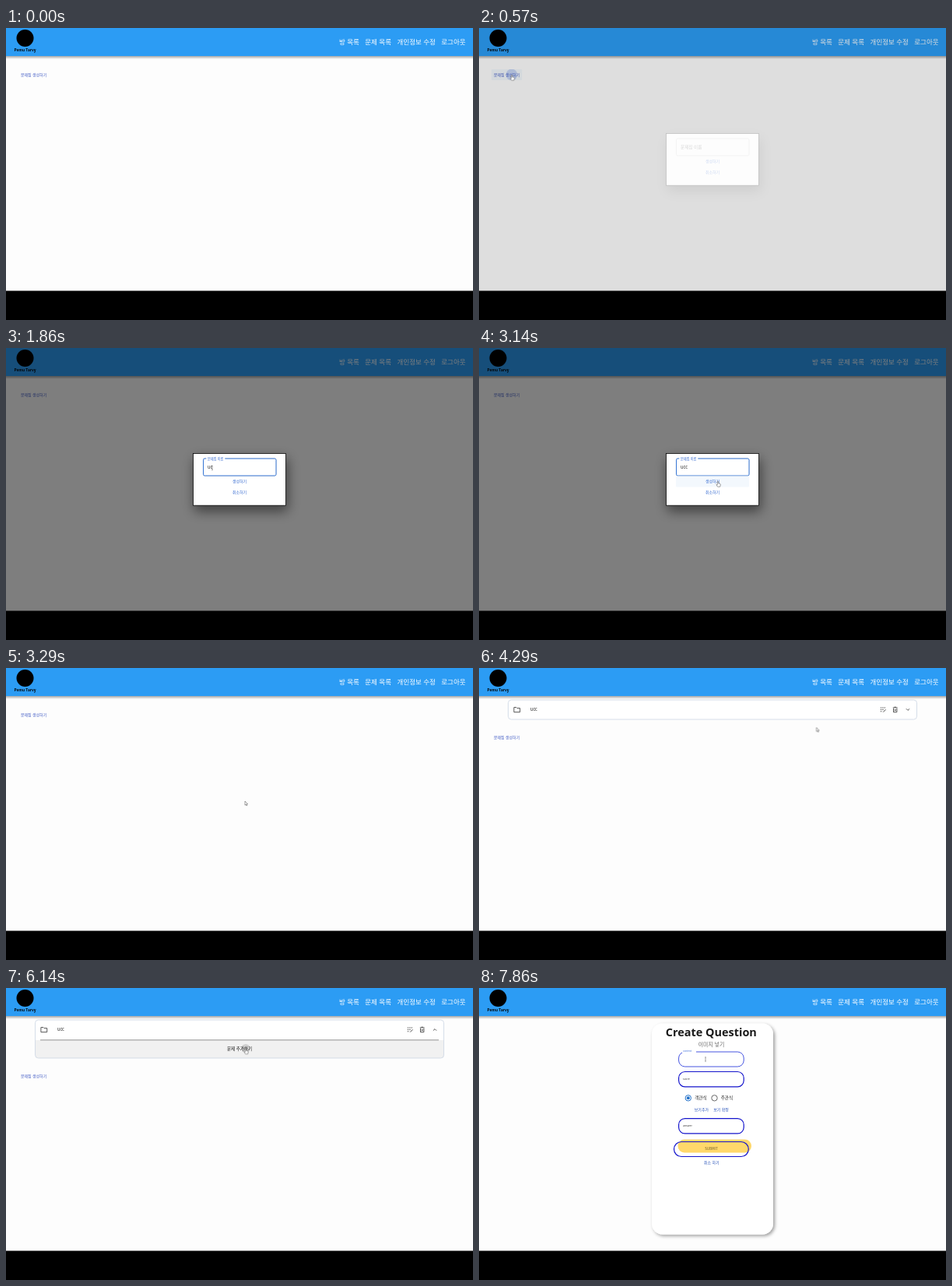
Animation, 600 px wide and 375 px high, one loop 8 s. Source, as an HTML page:

```html
<!DOCTYPE html>
<html lang="ko">
<head>
<meta charset="utf-8">
<title>문제 목록</title>
<style>
html, body { margin: 0; width: 100%; height: 100%; overflow: hidden; background: #000; }
svg { display: block; width: 100vw; height: 100vh; }
text { font-family: "Noto Sans CJK KR", "Noto Sans CJK", "Noto Sans", sans-serif; }
.nav text { font-size: 8.5px; fill: #fff; }
.s { font-size: 4.95px; }
.m { font-size: 5.6px; }
.link { fill: #3f59c4; }
.act { fill: #2f66cf; }
.mid { text-anchor: middle; }
.box { fill: none; stroke: #1414cc; stroke-width: 1.2; }
.icon { fill: none; stroke: #444; stroke-width: .9; }

/* one clock for everything: 1% is 80 ms */
.a { animation: 8s linear infinite; }
.h { animation: 8s step-end infinite; }

.quiz { animation-name: quiz; }
@keyframes quiz { 0% { opacity: 1 } 78.5%, 100% { opacity: 0 } }
.create { animation-name: create; }
@keyframes create { 0% { opacity: 0 } 78.5%, 100% { opacity: 1 } }

.newset { animation-name: newset; }
@keyframes newset {
  0%, 42.8% { transform: translateY(0) }
  42.81%, 62% { transform: translateY(29px); animation-timing-function: cubic-bezier(.4,0,.2,1) }
  66.1%, 100% { transform: translateY(53px) }
}
.linkhover { animation-name: linkhover; }
@keyframes linkhover { 0% { opacity: 0 } 5.35% { opacity: 1 } 10.7%, 100% { opacity: 0 } }
.linkripple { animation-name: linkripple; }
@keyframes linkripple {
  0%, 6.2% { r: 2px; opacity: 0 }
  6.3% { r: 2px; opacity: .24 }
  8.8%, 10.6% { r: 18px; opacity: .24 }
  12%, 100% { r: 20px; opacity: 0 }
}

.modal { animation-name: modal; }
@keyframes modal {
  0%, 6.6% { opacity: 0 }
  8.8%, 41.05% { opacity: 1 }
  41.06%, 100% { opacity: 0 }
}
.focus { animation-name: focus; }
@keyframes focus { 0% { opacity: 0 } 14.25%, 100% { opacity: 1 } }
.label { animation-name: label; }
@keyframes label {
  0%, 14.25% { transform: translate(259px, 155.1px); fill: #666; animation-timing-function: ease-out }
  16.8%, 100% { transform: translate(259px, 143.6px) scale(.75); fill: #2f66cf }
}
.k1 { animation-name: k1; }
.k2 { animation-name: k2; }
.k3 { animation-name: k3; }
@keyframes k1 { 0% { opacity: 0 } 21.3%, 100% { opacity: 1 } }
@keyframes k2 { 0% { opacity: 0 } 23.2%, 100% { opacity: 1 } }
@keyframes k3 { 0% { opacity: 0 } 25%, 100% { opacity: 1 } }
.okhover { animation-name: okhover; }
@keyframes okhover { 0% { opacity: 0 } 34.5%, 100% { opacity: 1 } }

.item { animation-name: item; }
@keyframes item { 0% { opacity: 0 } 42.8%, 100% { opacity: 1 } }
.grow { animation-name: grow; }
@keyframes grow {
  0%, 62% { height: 25px; animation-timing-function: cubic-bezier(.4,0,.2,1) }
  66.1%, 100% { height: 49px }
}
.body { animation-name: body; }
@keyframes body { 0% { opacity: 0 } 62%, 100% { opacity: 1 } }
.chev { animation-name: chev; transform-origin: 551px 53.5px; }
@keyframes chev { 0%, 62% { transform: rotate(180deg) } 64%, 100% { transform: rotate(0) } }
.wave { animation-name: wave; }
@keyframes wave {
  0%, 61.9% { r: 10px; opacity: 0 }
  62% { r: 10px; opacity: .18 }
  64.2%, 66% { r: 278px; opacity: .18 }
  67.9% { r: 440px; opacity: .09 }
  69.6%, 100% { r: 440px; opacity: 0 }
}
.addhover { animation-name: addhover; }
@keyframes addhover { 0% { opacity: 0 } 71.3%, 100% { opacity: 1 } }
.addripple { animation-name: addripple; }
@keyframes addripple {
  0%, 75% { r: 0; opacity: 0 }
  75.1% { r: 1px; opacity: .14 }
  76.7%, 100% { r: 5.6px; opacity: .14 }
}

.cfocus { animation-name: cfocus; }
@keyframes cfocus { 0% { opacity: 0 } 92.9%, 100% { opacity: 1 } }
.cidle { animation-name: cidle; }
@keyframes cidle { 0% { opacity: 1 } 92.9%, 100% { opacity: 0 } }
.clabel { animation-name: clabel; }
@keyframes clabel {
  0%, 92.9% { transform: translate(262px, 92.3px); fill: #333; animation-timing-function: ease-out }
  95.4%, 100% { transform: translate(262px, 82px) scale(.88); fill: #3567d8 }
}

.cursor { animation-name: cursor; animation-timing-function: ease-in-out; }
@keyframes cursor {
  0%, 5.35% { transform: translate(42px, 62px) }
  7.1% { transform: translate(42px, 60px) }
  8.8% { transform: translate(261.5px, 123.3px) }
  12.5% { transform: translate(285px, 152px) }
  17.8%, 30.4% { transform: translate(265px, 154px) }
  37.5%, 44.6% { transform: translate(307px, 171px) }
  57.1%, 66.1% { transform: translate(457.5px, 58.5px) }
  73.2%, 85.8% { transform: translate(308px, 77.5px) }
  93%, 100% { transform: translate(291px, 91.5px) }
}
.arrow { animation-name: arrow; }
@keyframes arrow {
  0% { opacity: 0 } 7.6% { opacity: 1 } 11.6% { opacity: 0 }
  41.06% { opacity: 1 } 56% { opacity: 0 }
  78.5% { opacity: 1 } 89%, 100% { opacity: 0 }
}
.hand { animation-name: hand; }
@keyframes hand {
  0% { opacity: 0 } 5.35% { opacity: 1 } 7.6% { opacity: 0 }
  34.5% { opacity: 1 } 41.06% { opacity: 0 }
  56% { opacity: 1 } 78.5%, 100% { opacity: 0 }
}
.beam { animation-name: beam; }
@keyframes beam {
  0% { opacity: 0 } 11.6% { opacity: 1 } 34.5% { opacity: 0 } 89%, 100% { opacity: 1 }
}
</style>
</head>
<body>
<svg viewBox="0 0 600 375" preserveAspectRatio="none">
  <defs>
    <linearGradient id="drop" x2="0" y2="1">
      <stop stop-color="#000" stop-opacity=".34"/>
      <stop offset="1" stop-color="#000" stop-opacity="0"/>
    </linearGradient>
    <filter id="deep" x="-50%" y="-50%" width="200%" height="220%">
      <feDropShadow dy="7" stdDeviation="8" flood-opacity=".5"/>
    </filter>
    <filter id="soft" x="-20%" y="-20%" width="140%" height="140%">
      <feDropShadow dy="2" stdDeviation="2.2" flood-opacity=".38"/>
    </filter>
    <clipPath id="linkclip"><rect x="16" y="53" width="39.5" height="14" rx="1.2"/></clipPath>
    <clipPath id="itemclip"><rect class="a grow" x="37.5" y="41" width="525.5" height="25" rx="4"/></clipPath>
    <clipPath id="headclip"><rect x="37.5" y="44" width="525.5" height="19"/></clipPath>
  </defs>

  <rect width="600" height="338" fill="#fdfdfd"/>
  <rect y="36" width="600" height="4" fill="url(#drop)"/>
  <rect width="600" height="36" fill="#2c9cf4"/>
  <circle cx="24.5" cy="13" r="11" fill="#000"/>
  <text class="mid" x="24.5" y="30" font-size="4.8" font-weight="700">Pemu Tarvy</text>
  <g class="nav">
    <text x="428" y="21.2">방 목록</text>
    <text x="461.3" y="21.2">문제 목록</text>
    <text x="502.6" y="21.2">개인정보 수정</text>
    <text x="559.3" y="21.2">로그아웃</text>
  </g>

  <g class="h quiz">
    <g class="a newset">
      <g clip-path="url(#linkclip)">
        <rect class="h linkhover" x="16" y="53" width="39.5" height="14" fill="#1976d2" fill-opacity=".05"/>
        <circle class="a linkripple" cx="42" cy="60" r="2" fill="#3f6ee0"/>
      </g>
      <text class="s link" x="19" y="61.8">문제집 생성하기</text>
    </g>

    <g class="h item">
      <rect class="a grow" x="37.5" y="41" width="525" height="25" rx="4" fill="#fff"/>
      <g clip-path="url(#itemclip)">
        <g class="h body">
          <rect class="h addhover" x="37.5" y="67" width="525" height="24" fill="#f1f1f1"/>
          <circle class="a addripple" cx="308" cy="77.5" r="0" fill="#000"/>
          <path d="M44 66.8H556" stroke="#b4b4b4" stroke-width="1.4"/>
          <text class="mid" x="300" y="80" font-size="5.55" fill="#111">문제 추가하기</text>
        </g>
        <g clip-path="url(#headclip)">
          <circle class="a wave" cx="458" cy="60" r="10" fill="#000"/>
        </g>
        <path class="icon" d="M44.9 50.6H48L49 51.6H52.7V56.7H44.9Z"/>
        <text class="m" x="66" y="55" fill="#222">ucc</text>
        <path class="icon" d="M515.8 51H522.8M515.8 53.4H520M515.8 55.8H518.4" stroke-dasharray="1.5 .9"/>
        <path class="icon" d="M519.3 56.6L522.6 53.3"/>
        <path class="icon" d="M531.8 50.9H537.6M533.6 50.2H535.8M532.5 51.8V56.7H536.9V51.8M533.8 53.2L535.6 55.2M535.6 53.2L533.8 55.2"/>
        <path class="icon a chev" d="M548.9 54.7L551 52.6L553.1 54.7"/>
      </g>
      <rect class="a grow" x="37.5" y="41" width="525" height="25" rx="4" fill="none" stroke="#ccd6e4" stroke-width=".8"/>
    </g>
  </g>

  <g class="a modal">
    <rect width="600" height="338" fill="#000" fill-opacity=".5"/>
    <rect x="240.4" y="135.4" width="119.2" height="66.8" fill="#fff" stroke="#000" stroke-width=".8" filter="url(#deep)"/>
    <rect x="253.5" y="142" width="93.5" height="22" rx="1.8" fill="none" stroke="#c4c4c4" stroke-width=".7"/>
    <g class="h focus">
      <rect x="253.5" y="142" width="93.5" height="22" rx="1.8" fill="#fff" stroke="#3474d4"/>
      <path d="M257.3 142H281.3" stroke="#fff" stroke-width="2"/>
    </g>
    <text class="m a label">문제집 이름</text>
    <text class="m" x="259" y="155.2" fill="#222"><tspan class="h k1" visibility="hidden"></tspan></text>
    <g class="m" fill="#222">
      <text class="h k1" x="259" y="155.2">u</text>
      <text class="h k2" x="262.4" y="155.2">c</text>
      <text class="h k3" x="265.3" y="155.2">c</text>
    </g>
    <rect class="h okhover" x="253" y="164.5" width="94" height="14" rx="1.2" fill="#f3f8fd"/>
    <text class="s act mid" x="300" y="172.7">생성하기</text>
    <text class="s act mid" x="300" y="186.8">취소하기</text>
  </g>

  <g class="h create">
    <rect x="222" y="45.5" width="156" height="271" rx="14" fill="#fff" filter="url(#soft)"/>
    <text class="mid" x="298.3" y="61.6" font-size="14.45" font-weight="700" fill="#1b1b1b" style="font-family:'Open Sans','Noto Sans',sans-serif">Create Question</text>
    <text class="mid" x="298.5" y="75.1" font-size="6.85" fill="#666">이미지 넣기</text>

    <rect class="box h cidle" x="256.6" y="82" width="83.6" height="19" rx="8"/>
    <g class="h cfocus">
      <rect x="256.6" y="82" width="83.6" height="19" rx="8" fill="none" stroke="#4655e0"/>
      <path d="M260.8 82H279" stroke="#fff" stroke-width="2"/>
    </g>
    <text class="a clabel" font-size="3.5">content</text>
    <rect class="box" x="256.6" y="107.5" width="83.6" height="19.3" rx="8"/>
    <text x="262" y="118.2" font-size="3.5" fill="#333">score</text>

    <circle cx="268.8" cy="141.3" r="3.7" fill="none" stroke="#1f6fc8"/>
    <circle cx="268.8" cy="141.3" r="2" fill="#1f6fc8"/>
    <circle cx="302.5" cy="141.3" r="3.7" fill="none" stroke="#666"/>
    <g class="m" fill="#222">
      <text x="277.2" y="143.3">객관식</text>
      <text x="310.7" y="143.3">주관식</text>
    </g>
    <g class="s" fill="#2550b8">
      <text x="276.8" y="157.9">보기추가</text>
      <text x="301.2" y="157.9">보기 확정</text>
    </g>

    <rect class="box" x="256.6" y="167.6" width="83.6" height="19.3" rx="8"/>
    <text x="262" y="178.2" font-size="3.5" fill="#333">answer</text>

    <rect x="255.5" y="194.6" width="94.5" height="16.8" rx="8.4" fill="#ffd86b"/>
    <rect class="box" x="250.5" y="197.5" width="95.8" height="19" rx="9.5"/>
    <text class="mid" x="298.6" y="208" font-size="4.2" letter-spacing=".2" fill="#5e5020">SUBMIT</text>
    <text class="s mid" x="298.8" y="225.8" fill="#2550b8">취소 하기</text>
  </g>

  <g class="a cursor" stroke="#444" stroke-width=".5" fill="#fff">
    <path class="h arrow" d="M0 0V5.2L1.2 4.1L2 5.9L2.8 5.5L2 3.8H3.6Z"/>
    <path class="h hand" d="M-.7 .5Q0 -.4 .7 .5V2.9L2.8 3.4Q3.5 3.7 3.3 4.6L2.7 7.2H-.4L-2.1 4.6Q-1.7 3.9 -.7 4.7Z"/>
    <path class="h beam" d="M-.8 -2.6H.8M0 -2.6V2.6M-.8 2.6H.8"/>
  </g>

  <rect y="337.5" width="600" height="37.5" fill="#000"/>
</svg>
</body>
</html>
```
